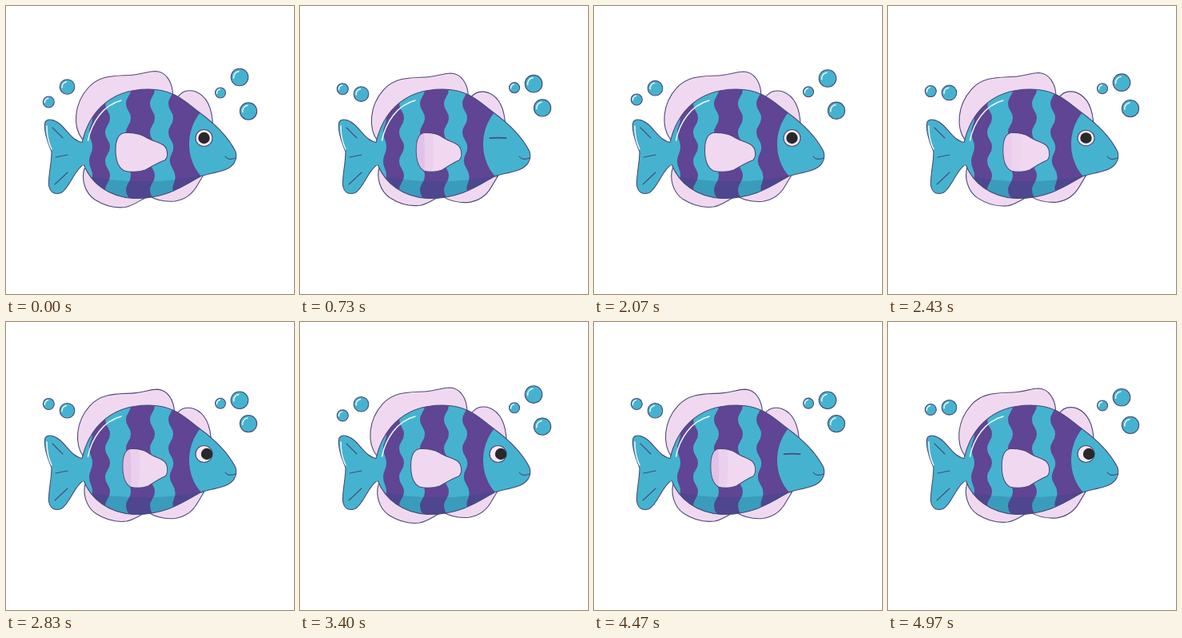
Recreate the animation shown at these times as an HTML page. Size 360x360 px, loop 5000 ms.

```html
<!DOCTYPE html>
<html lang="en">
<head>
<meta charset="utf-8">
<title>Fish</title>
<style>
  html, body { margin: 0; width: 100%; height: 100%; overflow: hidden; background: #fff; }
  svg { display: block; width: 100vw; height: 100vh; --p: 0; }
  .line { stroke: #4b4a7a; stroke-width: 1.1; stroke-linecap: round; stroke-linejoin: round; }
  .none { fill: none; }
  .teal { fill: #45b3cf; }
  .purple { fill: #5f4594; }
  .pink { fill: #f0d9f0; }
  .shine { fill: none; stroke: #e9f8fc; stroke-width: 1.5; stroke-linecap: round; }
  .drift { transform: translate(calc(var(--dx, 0) * var(--p) * 1px), calc(var(--dy, 0) * var(--p) * 1px)); }
  #fin { transform-origin: 202px 183px; transform: scaleX(calc(1 - .14 * var(--p))); }
  #folds { opacity: calc((var(--p) - .6) * 3.3); }
  #eye { transform-origin: 247.5px 165px; }
</style>
</head>
<body>
<svg id="stage" viewBox="0 0 360 360">
  <defs>
    <path id="shape" d="M95 171C102 140 124 104 178 104C212 104 225 121 243 134C262 148 278 164 287 182C290 193 284 202 270 206C260 209 252 210 243 213C222 225 200 241 160 240.500C128 239 106 221 97 198C94 190 94 180 95 171Z"/>
    <clipPath id="body"><use href="#shape"/></clipPath>
    <path id="finShape" d="M137 180C137 169 140 160 148 158.500C157 158 166 159 173 163C181 168 190 170 197 174C203 179 203 190 198 193C189 196 182 201 174 205C165 208 154 208 148 206C140 202 137 192 137 180Z"/>
    <clipPath id="finClip"><use href="#finShape"/></clipPath>
  </defs>

  <g class="pink line">
    <path class="drift" style="--dx:2;--dy:2.7" d="M95 166C84 151 84 123 103 102C119 84 142 88 160 86C172 85 177 81.500 187 81.500C200 82 208 95 208.500 110L150 150Z"/>
    <path class="drift" style="--dx:-2;--dy:1.500" d="M214 115C219 107 227 104 237 107C252 113 258 130 258.500 150L230 160Z"/>
    <path class="drift" style="--dx:1.500;--dy:-2.500" d="M98 203C94 216 98 233 111 242C122 249 136 253 149 251.500C161 249 168 242 178 238L140 215Z"/>
    <path class="drift" style="--dx:.5;--dy:1.500" d="M178 237C188 243 199 245 211 244C223 242 232 236 238 226L247 211L210 215Z"/>
  </g>

  <path class="teal line" d="M97 171C84 169 79 159 70 150C63 143 53 139 49 145C47 153 51 168 57 182C57 197 53 210 53.500 224C55 234 62 236 69 233.500C80 227 85 205 97 198Z"/>
  <path class="line none" d="M58 152L71 165M62 189L77 186M61 223L77 208"/>
  <path class="shine" d="M51 150C51 160 53 171 57 179"/>

  <use href="#shape" class="teal"/>
  <g clip-path="url(#body)">
    <path class="purple" d="M106 95q4 9 0 18t0 18t0 18t0 18t0 18t0 18t0 18t0 18H127q-6-9 0-18t0-18t0-18t0-18t0-18t0-18t1-18t4-18Z"/>
    <path class="purple" d="M153 95q6 9 0 18t0 18t0 18t0 18t0 18t0 18t0 18t0 18v6H183v-6q-6-9 0-18t0-18t0-18t0-18t0-18t0-18t0-18t0-18Z"/>
    <path class="purple" d="M206 95q6 9 0 18t0 18t0 18t0 18t1 18t1 18t2 18t2 18H245V214C224 192 224 156 243 133V95Z"/>
    <path fill="#164878" opacity=".22" d="M95 211C140 222 205 222 247 211V250H95Z"/>
  </g>
  <use href="#shape" class="none line"/>
  <path class="teal" d="M92 171.500L99 170V198L92 200Z"/>
  <path class="shine" d="M102.500 168C107 146 121 124 144 118"/>
  <path class="line none" d="M274 188C277 192 282 192 287 190"/>

  <g id="fin">
    <use href="#finShape" class="pink"/>
    <g id="folds" clip-path="url(#finClip)">
      <path fill="#ead0ee" d="M130 150H160Q165 183 159 212H130Z"/>
      <path fill="#e2c1e7" d="M130 150H147Q151 183 148 212H130Z"/>
    </g>
    <use href="#finShape" class="none line"/>
  </g>

  <g id="eye">
    <circle class="line" cx="247.500" cy="165" r="10.500" fill="#fbeaf6"/>
    <circle id="pupil" cx="247.500" cy="165" r="7.200" fill="#29282c"/>
  </g>
  <path id="lid" class="line none" style="stroke-width:1.800" d="M237.500 165.200Q248 164 257.500 165.200"/>

  <g id="bubbles"></g>
</svg>
<script>
  const LOOP = 5000, SWING = 1825;
  const get = id => document.getElementById(id);
  const clamp = v => Math.min(1, Math.max(0, v));
  const ramp = (v, a, b) => clamp((v - a) / (b - a));

  // x, y, radius, vertical travel
  const bubbles = [
    [53.3, 120, 7, -18], [76.5, 101, 9.3, 10],
    [292, 89, 10.8, 9], [268, 108.5, 6.5, -7], [303, 131.5, 10.6, -4.5]
  ];
  get('bubbles').innerHTML = bubbles.map(([x, y, r, dy]) => {
    const h = r * .68;
    return `<g class="drift" style="--dy:${dy}">
      <circle class="teal line" cx="${x}" cy="${y}" r="${r}"/>
      <path class="shine" d="M${x - h} ${y + r * .1}A${h} ${h} 0 0 1 ${x - r * .1} ${y - h}"/></g>`;
  }).join('');

  function draw() {
    const t = performance.now() % LOOP;
    const phase = t / SWING % 1;
    get('stage').style.setProperty('--p', (1 - Math.cos(phase * 2 * Math.PI)) / 2);

    // The pupil looks forward behind the closed lid, then drifts back.
    const open = 1 - ramp(phase, .33, .36) + ramp(phase, .45, .48);
    const look = ramp(phase, .38, .42) - ramp(phase, .9, .98);
    get('eye').style.transform = `scaleY(${open})`;
    get('lid').style.visibility = open < .1 ? 'visible' : 'hidden';
    get('pupil').setAttribute('cx', 247.5 + 3.5 * look);
    requestAnimationFrame(draw);
  }
  draw();
</script>
</body>
</html>
```
